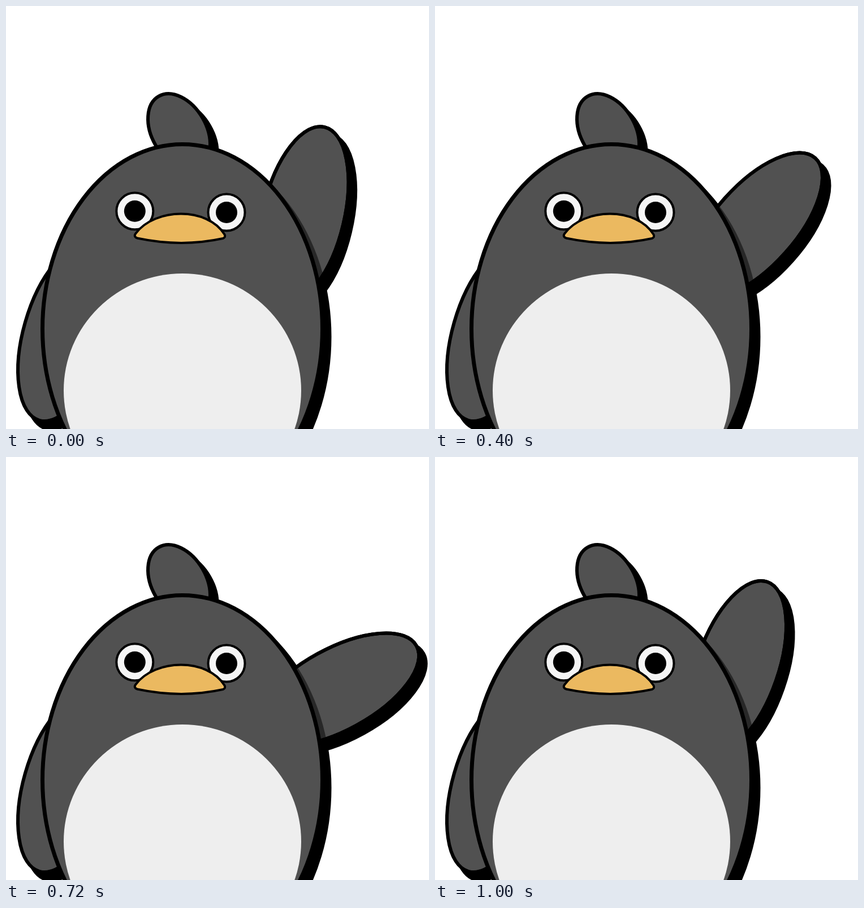
An HTML page with a canvas for the animation above (1040 ms loop, 748 px wide and 748 px high).

```html
<!DOCTYPE html>
<html lang="en">
<head>
<meta charset="utf-8">
<title>Waving penguin</title>
<style>
html, body { margin: 0; width: 100%; height: 100%; overflow: hidden; background: #fff; }
canvas { display: block; width: 748px; height: 748px; }
</style>
</head>
<body>
<canvas id="stage" width="748" height="748"></canvas>
<script>
const ctx = document.getElementById('stage').getContext('2d');
const LOOP = 1040, STEP = 40;
const GREY = '#515151', SHADE = { x: 12, y: 14 };
const WING = { rx: 72, ry: 160 };
const SHOULDER = { x: 509.3, y: 457.5, reach: 89.4, lean: 2.5 };
const RAD = Math.PI / 180;

// wing angle from vertical: [ms, degrees]
const KEYS = [[0, 13.4], [100, 6], [160, 8.4], [280, 23.7], [400, 41.7], [560, 71.8],
  [600, 75], [640, 73], [720, 61.2], [840, 43.4], [1000, 19.2]];

function key(i) {
  const n = KEYS.length, lap = Math.floor(i / n);
  const [t, v] = KEYS[i - lap * n];
  return [t + lap * LOOP, v];
}

function slope(i) {
  const [t0, v0] = key(i - 1), [t1, v1] = key(i), [t2, v2] = key(i + 1);
  const a = (v1 - v0) / (t1 - t0), b = (v2 - v1) / (t2 - t1);
  if (a * b <= 0) return 0;
  return (a * (t2 - t1) + b * (t1 - t0)) / (t2 - t0);
}

// smooth periodic curve through the keys
function wingAngle(t) {
  let i = KEYS.length - 1;
  while (KEYS[i][0] > t) i--;
  const [t0, v0] = key(i), [t1, v1] = key(i + 1);
  const h = t1 - t0, u = (t - t0) / h, w = 1 - u;
  return v0 * w * w * (1 + 2 * u) + v1 * u * u * (3 - 2 * u)
    + h * u * w * (slope(i) * w - slope(i + 1) * u);
}

function oval(x, y, rx, ry, deg = 0, line = 6) {
  const path = new Path2D();
  path.ellipse(x, y, rx, ry, deg * RAD, 0, 2 * Math.PI);
  return { path, line };
}

function paint({ path, line }, fill) {
  ctx.fillStyle = fill;
  ctx.fill(path);
  if (line) {
    ctx.strokeStyle = '#000';
    ctx.lineWidth = line;
    ctx.stroke(path);
  }
}

function shadow({ path, line }) {
  ctx.save();
  ctx.translate(SHADE.x, SHADE.y);
  paint({ path, line: line + 1 }, '#000');
  ctx.restore();
}

const body = oval(312, 571, 247.5, 326.5, 0, 7);
const belly = oval(312, 680, 210, 207, 0, 0);
const tuft = oval(306, 222, 48, 72, -30);
const leftWing = oval(103.2, 579, WING.rx, WING.ry, 16);
const beak = {
  path: new Path2D('M229.5 402C264 356.5 356 355 386.5 404Q389 409 383.5 411Q310 427 232 410.5Q225 407.5 229.5 402Z'),
  line: 4
};

function raisedWing(deg) {
  const a = (deg - SHOULDER.lean) * RAD;
  return oval(SHOULDER.x + SHOULDER.reach * Math.sin(a),
    SHOULDER.y - SHOULDER.reach * Math.cos(a), WING.rx, WING.ry, deg);
}

// darkened band the body casts on the raised wing
function bodyShade(wing) {
  const band = new Path2D();
  band.ellipse(312 + SHADE.x, 571 + SHADE.y, 251, 330, 0, 0, 2 * Math.PI);
  ctx.save();
  ctx.clip(wing.path);
  ctx.fillStyle = 'rgba(0,0,0,0.5)';
  ctx.fill(band);
  ctx.restore();
  ctx.lineWidth = wing.line;
  ctx.strokeStyle = '#000';
  ctx.stroke(wing.path);
}

function eye(x, y) {
  paint(oval(x, y, 32.5, 32.5, 0, 4), '#f5f5f5');
  paint(oval(x, y, 19, 19, 0, 0), '#000');
}

function draw(t) {
  const wing = raisedWing(wingAngle(t));

  ctx.fillStyle = '#fff';
  ctx.fillRect(0, 0, 748, 748);
  for (const s of [body, tuft, leftWing, wing]) shadow(s);
  for (const s of [tuft, leftWing, wing]) paint(s, GREY);
  bodyShade(wing);
  paint(body, GREY);
  paint(belly, '#eee');
  eye(227.8, 362.8);
  eye(390, 365);
  paint(beak, '#ebb960');
}

const start = performance.now();
function tick() {
  const t = (performance.now() - start) % LOOP;
  draw(Math.floor(t / STEP) * STEP);
  requestAnimationFrame(tick);
}
ctx.lineJoin = 'round';
tick();
</script>
</body>
</html>
```
